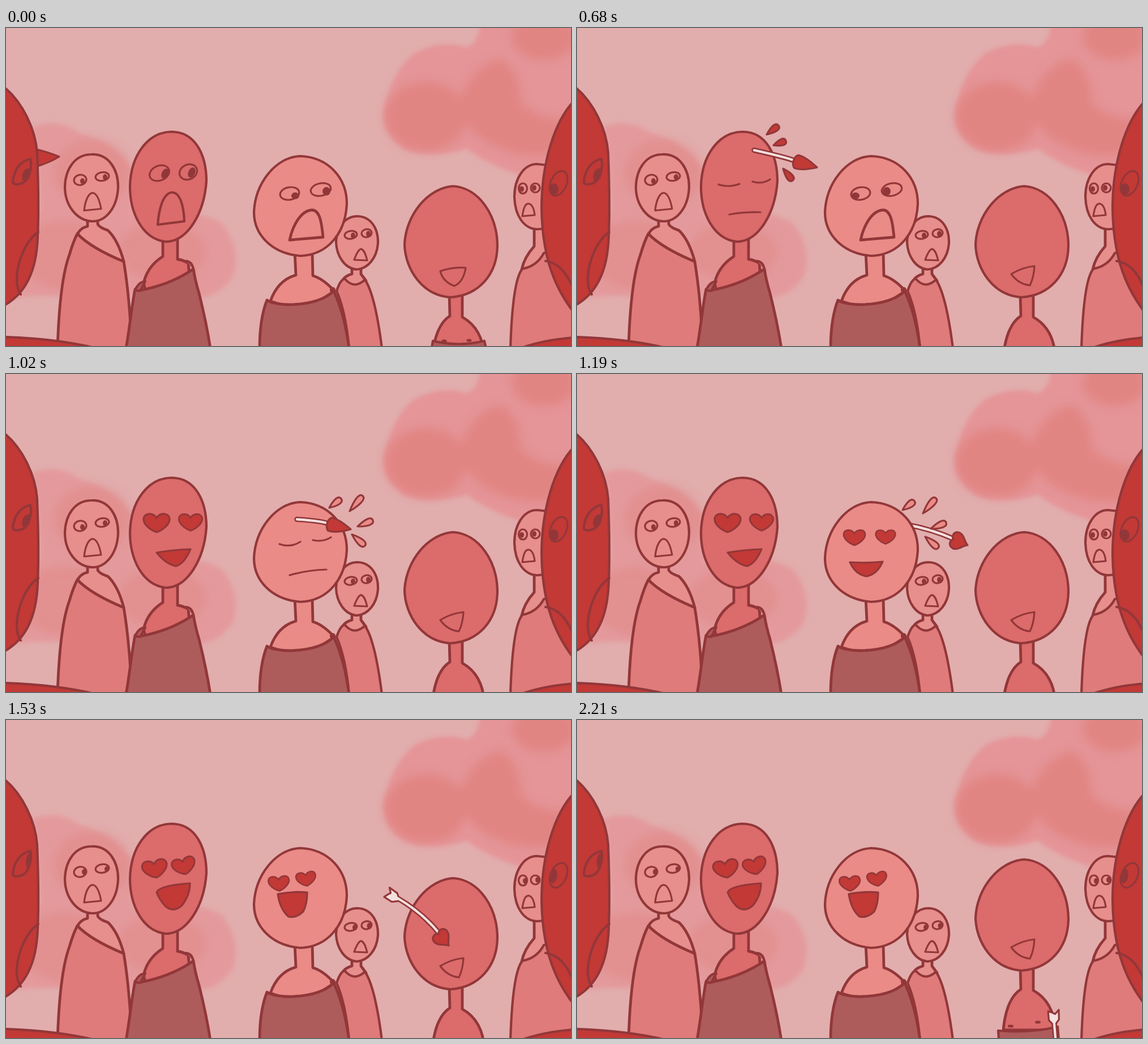
Write an HTML page that moves like this. It is 998 px wide and 561 px high and loops after 2380 ms.

```html
<!DOCTYPE html>
<html lang="en">
<head>
<meta charset="utf-8">
<title>Arrow through the crowd</title>
<style>
  html, body { margin: 0; width: 100%; height: 100%; overflow: hidden; background: #e2adad; }
  svg { display: block; width: 100vw; height: 100vh; }
  .ink { stroke: #923739; stroke-width: 4.2; stroke-linejoin: round; stroke-linecap: round; fill: none; }
  .thin { stroke-width: 3.2; }
  .body { stroke-width: 4.8; }
  .red { fill: #c23936; }
  .deep { fill: #dc6b6b; }
  .rose { fill: #ea8b87; }
  .soft { fill: #e78f8d; }
  .coat { fill: #df7b7a; }
  .robe { fill: #ae5b5c; }
  .white { fill: #f3e0df; }
  .pupil { fill: #923739; }
</style>
</head>
<body>
<svg viewBox="0 0 998 561" preserveAspectRatio="none">
  <defs>
    <filter id="haze" x="-20%" y="-20%" width="140%" height="140%"><feGaussianBlur stdDeviation="3.5"/></filter>
    <filter id="mist" x="-30%" y="-30%" width="160%" height="160%"><feGaussianBlur stdDeviation="8"/></filter>
  </defs>
  <rect width="998" height="561" fill="#e2adad"/>

  <g fill="#e59497" filter="url(#haze)">
    <path d="M838 -10Q834 30 812 34Q770 20 722 44Q682 75 667 145Q664 190 706 215Q750 232 814 213Q850 240 905 258L1010 250V-10Z"/>
    <path d="M30 182Q85 152 130 185Q185 198 225 250L225 332Q330 312 382 345Q418 392 400 440Q370 480 330 476L60 472L-10 478V320L60 322L50 190Z" opacity=".75"/>
  </g>
  <g fill="#e18583" filter="url(#mist)">
    <ellipse cx="742" cy="156" rx="72" ry="60"/>
    <path d="M800 130Q825 65 875 55Q910 80 908 130Q940 165 998 160V215Q920 235 870 210Q810 190 800 130Z"/>
    <ellipse cx="950" cy="16" rx="56" ry="40"/>
    <g opacity=".5">
      <ellipse cx="152" cy="255" rx="68" ry="58"/>
      <ellipse cx="105" cy="400" rx="80" ry="60"/>
      <ellipse cx="275" cy="395" rx="78" ry="50"/>
    </g>
  </g>

  <g class="ink">
    <path class="soft body" d="M144 336V350Q133 352 127 362L150 420L208 412Q198 374 180 357Q165 352 162 346V336Z"/>
    <path class="coat body" d="M91 565C93 500 99 435 112 400Q119 376 126 363Q150 388 208 412C216 460 220 510 222 565Z"/>
    <path class="soft" d="M151 223C182 222 198 250 198 280C197 316 177 341 153 341C124 340 104 312 104 280C105 248 122 223 151 223Z"/>
  </g>
  <g id="face1"></g>
  <g id="back"></g>

  <g class="ink">
    <path class="deep body" d="M277 370V403Q250 420 243 450L250 480L325 450L322 415Q312 409 303 408V370Z"/>
    <path class="robe body" d="M212 565C219 525 222 490 228 461Q233 465 240 462Q292 452 331 425Q334 445 341 468Q354 520 361 565Z"/>
    <path class="robe" d="M229 460Q236 447 246 447L238 462M318 411Q329 412 331 426"/>
    <path class="deep" d="M292 183C335 183 354 225 354 270C350 328 320 377 282 377C240 372 219 325 219 280C220 225 250 184 292 183Z"/>

    <path class="soft body" d="M611 422V434Q600 437 596 443L615 475L636 446Q630 438 627 434V422Z"/>
    <path class="coat" d="M584 464Q590 445 598 442Q615 462 634 444Q652 470 664 565H606Q600 500 584 464Z"/>
    <path class="soft" d="M621 332C645 333 658 354 657 380C655 406 639 425 619 426C598 424 584 402 583 378C584 350 600 332 621 332Z"/>

    <path class="rose body" d="M510 394L512 436Q480 445 467 482L525 500L580 464Q560 442 542 437L541 394Z"/>
    <path class="robe body" d="M448 565C448 530 453 500 461 480Q470 487 500 488Q555 487 579 464Q598 505 606 565Z"/>
    <circle cx="577" cy="462" r="3" class="pupil"/>
    <path class="rose" d="M520 226C570 228 602 265 602 310C600 360 570 400 520 402C470 398 438 365 438 325C440 275 475 228 520 226Z"/>
  </g>
  <g id="bald"></g>

  <g class="ink">
    <path class="soft body" d="M933 350V385Q915 405 911 426L960 440V350Z"/>
    <path class="coat" d="M891 565C893 500 899 440 912 425Q938 420 950 397L1004 385V565Z"/>
    <path class="soft" d="M938 240C915 240 898 265 898 298C899 332 915 354 938 355L975 352V244Z"/>
  </g>
  <g id="faces"></g>

  <g class="ink">
    <path class="red" d="M1004 128C968 165 946 240 946 318C947 390 962 450 1004 503Z"/>
    <path d="M953 411C975 414 990 430 1001 458"/>
    <path class="red" d="M-6 102C30 130 52 180 55 220C57 270 58 320 56 368C54 430 34 470 -6 491Z"/>
    <path d="M57 360C36 374 20 410 19 442Q19 460 26 470"/>
    <path class="red" d="M-5 545Q90 548 160 565H-5Z"/>
    <path class="red" d="M908 565Q950 550 1003 546V565Z"/>
  </g>
  <g id="giants"></g>
  <g id="front"></g>
</svg>

<script>
const STEP = 170, STEPS = 14;
const layer = id => document.getElementById(id);

const path = (d, cls = '', at = '') => `<path class="ink ${cls}" d="${d}" transform="${at}"/>`;
const oval = (x, y, rx, ry, cls = '', turn = 0) =>
  `<ellipse class="ink thin ${cls}" cx="${x}" cy="${y}" rx="${rx}" ry="${ry}" transform="rotate(${turn} ${x} ${y})"/>`;
const pupil = (x, y, rx, ry, turn = 0) =>
  `<ellipse class="pupil" cx="${x}" cy="${y}" rx="${rx}" ry="${ry}" transform="rotate(${turn} ${x} ${y})"/>`;
const degrees = (y, x) => Math.atan2(y, x) * 180 / Math.PI;

const heart = (x, y, size, turn = 0) =>
  path('M0 17C-10 14 -23 4 -23 -6C-22 -18 -6 -18 0 -8C6 -18 22 -18 23 -6C23 4 10 14 0 17Z',
    'thin red', `translate(${x} ${y}) rotate(${turn}) scale(${size})`);

// A drop runs from its sharp end to its round end.
function drop(x, y, endX, endY, cls) {
  const n = Math.hypot(endX - x, endY - y);
  return path(`M0 0C${n * .5} -6 ${n} -9 ${n} 0C${n} 9 ${n * .5} 6 0 0Z`,
    'thin ' + cls, `translate(${x} ${y}) rotate(${degrees(endY - y, endX - x)})`);
}

const HEART_TIP = 'M0 0C-8 -4 -13 -16 -23 -15C-33 -13 -32 -3 -27 0C-32 3 -33 13 -23 15C-13 16 -8 4 0 0Z';
const LEAF_TIP = 'M0 0C-12 -6 -26 -12 -38 -11C-45 -6 -45 8 -38 13C-26 14 -12 7 0 0Z';
const FEATHER = 'M0 -10L7 -3L4 2L1 9L17 9L28 0L17 -9Z';

function arrow({ from: [x, y], to: [u, v], bend = 0, feather = true, leaf = false }) {
  const n = Math.hypot(u - x, v - y), lean = degrees(bend * 2, n);
  const shaft = `M${feather ? 22 : 2} ${feather ? -bend * .5 : 0}` +
    `Q${n / 2} ${-bend * 1.4} ${n - (leaf ? 40 : 27)} ${-bend * .55}`;
  return `<g transform="translate(${x} ${y}) rotate(${degrees(v - y, u - x)})">` +
    `<path d="${shaft}" fill="none" stroke="#923739" stroke-width="9.5" stroke-linecap="round"/>` +
    (feather ? path(FEATHER, 'thin white', `rotate(${-lean})`) : '') +
    `<path d="${shaft}" fill="none" stroke="#f3e0df" stroke-width="4.2" stroke-linecap="round"/>` +
    path(leaf ? LEAF_TIP : HEART_TIP, 'thin red', `translate(${n} 0) rotate(${lean})`) + '</g>';
}

const flight = [
  null,
  { from: [38, 222], to: [168, 225], back: true },
  { from: [105, 229], to: [241, 232], back: true, bend: 2 },
  { from: [186, 223], to: [318, 235], back: true },
  { from: [311, 215], to: [424, 246], feather: false, leaf: true, bend: 2 },
  { from: [328, 228], to: [456, 262], back: true, bend: 5 },
  { from: [512, 256], to: [609, 274], feather: false, leaf: true, bend: 4 },
  { from: [560, 262], to: [690, 302], back: true, bend: 6 },
  { from: [610, 279], to: [747, 345], bend: 13 },
  { from: [672, 304], to: [782, 398], bend: 10 },
  { from: [728, 350], to: [818, 456], bend: 6 },
  { from: [763, 392], to: [842, 503], bend: 2 },
  { from: [812, 452], to: [850, 578] },
  { from: [841, 512], to: [852, 645] }
];

const scaredTall = () =>
  oval(271, 256, 18, 13, '', -22) + oval(322, 254, 16, 13, '', -25) +
  pupil(281, 257, 6, 9.5, 25) + pupil(328, 255, 6, 9.5, 25) +
  path('M268 347C270 320 277 292 293 290C309 290 314 318 315 341Z');

const stunnedTall = () =>
  path('M250 276Q268 282 287 275M310 271Q328 276 341 267M269 329Q296 324 324 325', 'thin');

function lovingTall(i) {
  if (i < 8) return heart(266, 262, 1) + heart(326, 261, .9) +
    path('M266 315Q296 310 326 309Q315 335 300 339Q282 335 266 315Z', 'thin red');
  const even = i % 2 === 0, x = even ? 0 : i % 4 === 3 ? 2 : -3;
  const eyes = even ? heart(265, 261, 1, 4) + heart(321, 257, .95) :
    heart(266 + x, 262, .96, -10) + heart(317 + x, 257, .9, -14);
  return eyes + path('M269 307Q273 295 328 291Q328 312 314 330Q298 344 284 331Q274 320 269 307Z',
    'thin red', `translate(${x} ${even ? 1 : -3})`);
}

function scaredRound(i) {
  const x = i >= 3 ? -19 : 0;
  return oval(501, 292, 17, 11, '', -10) + oval(556, 285, 18, 11, '', -12) +
    pupil(511 + x, 296, 7, 6) + pupil(566 + x, 288, 7, 7.5) +
    path('M501 374C506 350 520 322 541 321C556 322 558 350 560 369Z', 'body');
}

const stunnedRound = () =>
  path('M483 300Q502 307 520 296M542 293Q560 297 574 288M501 355Q530 346 566 345', 'thin');

function lovingRound(i) {
  if (i < 9) return heart(490, 288, .83) + heart(545, 287, .76) +
    path('M482 332Q510 334 540 331Q530 354 511 357Q492 354 482 332Z', 'thin red');
  if (i % 4 === 3) return heart(488, 285, .8, -10) + heart(537, 281, .78, -14) +
    path('M483 316Q508 304 535 301Q538 325 528 339Q515 355 504 355Q488 344 483 316Z', 'thin red');
  return heart(482, 288, .8, -4) + heart(530, 280, .76, -8) +
    path('M480 307Q505 302 532 304Q532 325 525 338Q512 350 499 347Q484 334 480 307Z', 'thin red');
}

function bald(i) {
  const lift = i < 10 ? 0 : i === 10 ? -18 : -33;
  const belt = lift ? path('M744 581Q800 586 849 574L852 610H746Z', 'robe') +
      oval(766, 573, 3.5, 1, 'pupil') + oval(814, 566, 3.5, 1, 'pupil')
    : i === 0 ? path('M754 552Q800 563 845 552L849 570H751Z', 'robe') +
      oval(774, 552, 3, 1, 'pupil') + oval(818, 551, 3, 1, 'pupil') : '';
  const mouth = i === 0 ? 'M767 429Q790 421 812 423Q808 448 792 455Q772 448 767 429Z'
    : 'M767 434Q787 422 808 420Q807 440 800 454Q780 452 767 434Z';
  return `<g transform="translate(0 ${lift})">` +
    path('M783 470L784 508Q758 525 753 580H845Q842 530 806 510V470Z', 'deep body') + belt +
    path('M790 279C835 282 868 330 868 385C867 435 835 472 785 475C735 472 705 425 704 382C706 330 745 282 790 279Z', 'deep') +
    path(mouth, 'thin') + '</g>';
}

function drops(i) {
  if (i === 3) return drop(212, 212, 203, 190, 'red') + drop(204, 250, 188, 262, 'red');
  if (i === 4) return drop(335, 188, 356, 172, 'red') + drop(347, 207, 369, 199, 'red') +
    drop(364, 248, 381, 269, 'red');
  if (i === 6 || i === 7) {
    const shift = i === 7 ? 4 : 0;
    return `<g transform="translate(${shift} ${shift})">` + drop(571, 236, 592, 220, 'rose') +
      drop(607, 242, 630, 215, 'rose') + drop(621, 269, 648, 258, 'rose') +
      drop(611, 283, 634, 303, 'rose') + '</g>';
  }
  return '';
}

function sideFaces(late) {
  const x = late ? 3 : 0;
  return oval(609, 365, 11, 7, '', -8) + oval(637, 362, 9, 7, '', -8) +
    pupil(613 + x, 366, 4, 5) + pupil(640 + x / 2, 363, 4, 5) +
    path('M615 409C619 398 624 389 628 390C634 393 636 403 638 410Z', 'thin') +
    oval(913, 283, 7.5, 9) + oval(935, 282, 8, 8) +
    pupil(late ? 917 : 911, 284, 4, 5) + pupil(late ? 939 : 933, 282, 4, 5) +
    path('M912 332C914 318 917 309 924 310C931 312 933 322 934 330Z', 'thin');
}

function giantEyes(late) {
  return path('M12 272C14 250 25 235 43 231C47 245 40 268 30 273C22 277 14 277 12 272Z') +
    oval(976, 274, 14, 23, '', 24) +
    (late ? pupil(40, 248, 5, 13, 8) + pupil(967, 275, 6.5, 13, 8)
          : pupil(36, 259, 7, 12, 20) + pupil(968, 284, 8, 10, -10));
}

function draw(i) {
  const late = i >= 9, shot = flight[i];
  layer('face1').innerHTML =
    oval(131, 268, 11, 9, '', -10) + oval(170, 262, 12, 7.5, '', -8) +
    pupil(late ? 138 : 135, late ? 268 : 270, 4, 5) + pupil(late ? 178 : 175, 263, 4, 5) +
    path('M138 322C140 302 147 290 154 291C162 293 166 308 168 319Z', 'thin');
  layer('back').innerHTML = !shot ? path('M50 213Q75 219 94 227Q76 238 52 245Z', 'thin red')
    : shot.back ? arrow(shot) : '';
  layer('bald').innerHTML = bald(i);
  layer('faces').innerHTML =
    (i < 3 ? scaredTall() : i < 5 ? stunnedTall() : lovingTall(i)) +
    (i < 6 ? scaredRound(i) : i < 7 ? stunnedRound() : lovingRound(i)) +
    sideFaces(late);
  layer('giants').innerHTML = giantEyes(late);
  layer('front').innerHTML = (shot && !shot.back ? arrow(shot) : '') + drops(i);
}

let shown = -1;
const start = performance.now();
function tick(now) {
  const i = Math.floor(Math.max(0, now - start) / STEP) % STEPS;
  if (i !== shown) draw(shown = i);
  requestAnimationFrame(tick);
}
tick(start);
</script>
</body>
</html>
```
